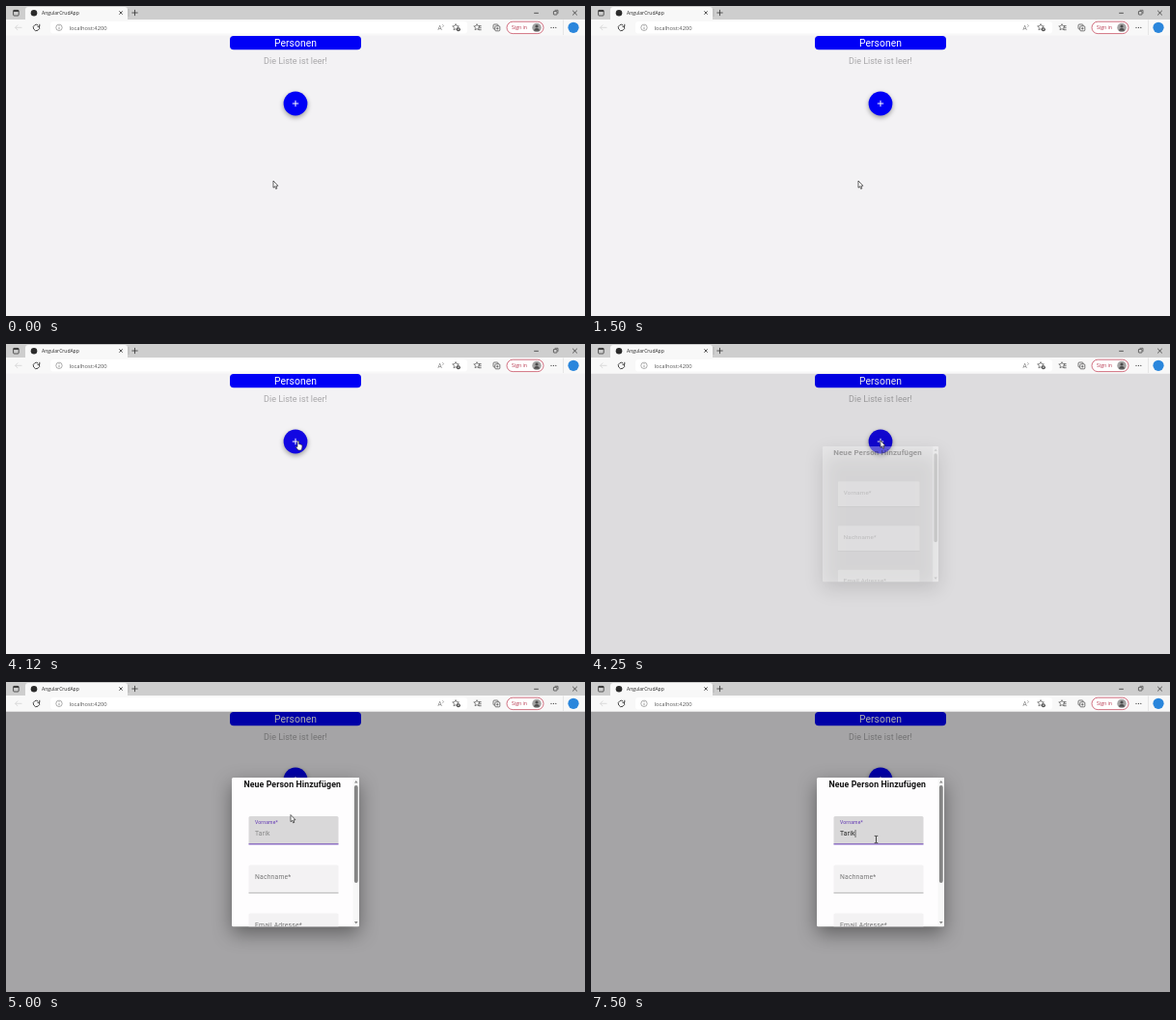
An HTML page with a canvas for the animation above (8000 ms loop, 600 px wide and 321 px high).

```html
<!DOCTYPE html>
<html lang="de">
<head>
<meta charset="utf-8">
<title>Personen</title>
<style>
html, body { margin: 0; width: 100%; height: 100%; overflow: hidden; background: #f3f2f4; }
canvas { display: block; width: 600px; height: 321px; }
</style>
</head>
<body>
<canvas id="stage"></canvas>
<script>
const W = 600, H = 321, LOOP = 8000, STEP = 125;
const canvas = document.getElementById('stage');
const ctx = canvas.getContext('2d');
const dpr = window.devicePixelRatio || 1;
canvas.width = W * dpr;
canvas.height = H * dpr;

const UI = '"Open Sans", "Noto Sans", sans-serif';
const APP = 'Roboto, Arial, sans-serif';
const NAME = 'Tarik';
const KEY_TIMES = [6000, 6500, 6750, 7250, 7500];
const PURPLE = '#6338b4';

// pointer path: time, x, y
const PATH = [
  [1875, 277, 181], [2500, 285, 151], [2625, 285, 151], [3500, 300, 100],
  [4750, 300, 100], [5000, 295, 137.5], [5250, 295.5, 163]
];

const clamp = v => Math.min(1, Math.max(0, v));
const lerp = (a, b, p) => a + (b - a) * p;
const span = (t, a, b) => clamp((t - a) / (b - a));
const smooth = p => p * p * (3 - 2 * p);

function rect(x, y, w, h, fill) {
  ctx.fillStyle = fill;
  ctx.fillRect(x, y, w, h);
}

function box(x, y, w, h, r, fill, stroke, lw = 0.8) {
  ctx.beginPath();
  ctx.roundRect(x, y, w, h, r);
  paint(fill, stroke, lw);
}

function disc(x, y, r, fill, stroke, lw = 0.8) {
  ctx.beginPath();
  ctx.arc(x, y, r, 0, Math.PI * 2);
  paint(fill, stroke, lw);
}

function paint(fill, stroke, lw) {
  if (fill) { ctx.fillStyle = fill; ctx.fill(); }
  if (stroke) { ctx.strokeStyle = stroke; ctx.lineWidth = lw; ctx.stroke(); }
}

function line(pts, color, lw = 0.8) {
  ctx.beginPath();
  for (let i = 0; i < pts.length; i += 2) ctx.lineTo(pts[i], pts[i + 1]);
  paint(null, color, lw);
}

function poly(pts, fill, stroke, lw) {
  ctx.beginPath();
  for (let i = 0; i < pts.length; i += 2) ctx.lineTo(pts[i], pts[i + 1]);
  ctx.closePath();
  paint(fill, stroke, lw);
}

function text(str, x, y, size, color, { font = APP, weight = 400, align = 'left', gap = 0 } = {}) {
  ctx.font = `${weight} ${size}px ${font}`;
  ctx.letterSpacing = gap * size + 'px';
  ctx.textAlign = align;
  ctx.fillStyle = color;
  ctx.fillText(str, x, y);
}

function shadow(color, blur, dy) {
  ctx.shadowColor = color;
  ctx.shadowBlur = blur * dpr;
  ctx.shadowOffsetY = dy * dpr;
}

function star(x, y, r, color) {
  const pts = [];
  for (let i = 0; i < 10; i++) {
    const a = -Math.PI / 2 + i * Math.PI / 5, d = i % 2 ? r * 0.48 : r;
    pts.push(x + d * Math.cos(a), y + d * Math.sin(a));
  }
  poly(pts, null, color, 0.7);
}

function drawTabs() {
  const dark = '#333';
  rect(0, 0, W, 14, '#cecece');
  box(20, 1, 106, 14, [3, 3, 0, 0], '#f8f8f8');
  box(7.6, 4.4, 5.6, 5.6, 1, null, dark);
  rect(7.6, 4.2, 5.6, 1.7, dark);
  disc(29, 7.2, 3.3, '#2b2b2b');
  text('AngularCrudApp', 37, 9, 5, '#222', { font: UI });
  line([117.3, 5.3, 120.7, 8.7], dark);
  line([120.7, 5.3, 117.3, 8.7], dark);
  line([127, 3, 127, 11], '#a8a8a8', 0.6);
  line([130.4, 7, 136.6, 7], dark);
  line([133.5, 3.9, 133.5, 10.1], dark);
  line([547.2, 7.3, 551.8, 7.3], dark);
  box(567.4, 5.4, 3.6, 3.6, 0.6, null, dark, 0.7);
  line([568.7, 4.3, 572, 4.3, 572, 7.8], dark, 0.6);
  line([587.2, 4.8, 591.8, 9.4], dark);
  line([591.8, 4.8, 587.2, 9.4], dark);
}

function drawToolbar() {
  const ink = '#555';
  rect(0, 14, W, 16.5, '#f8f8f8');
  line([16.5, 22.3, 9.5, 22.3], '#d4d4d4');
  line([12.3, 19.5, 9.5, 22.3, 12.3, 25.1], '#d4d4d4');
  ctx.beginPath();
  ctx.arc(31.5, 22.4, 3.2, -0.5, Math.PI * 1.65);
  paint(null, '#333', 0.9);
  line([34.8, 18.8, 34.8, 21.2, 32.3, 21.2], '#333', 0.9);

  box(46, 16, 432, 12.5, 3, '#fff');
  disc(55, 22.3, 3.2, null, '#777', 0.6);
  line([55, 21.8, 55, 24.2], '#777', 0.7);
  line([55, 20.3, 55, 21], '#777', 0.7);
  text('localhost:4200', 65.5, 24.6, 5.8, '#555', { font: UI });

  text('A', 447.4, 25, 6.6, '#777', { font: UI });
  line([452.4, 19.2, 453.4, 20.5, 452.4, 21.8], '#777', 0.6);
  star(466, 22, 3.5, ink);
  disc(468.8, 24.2, 2, '#444');
  line([467.7, 24.2, 469.9, 24.2], '#fff', 0.5);
  line([468.8, 23.1, 468.8, 25.3], '#fff', 0.5);

  star(488, 22, 3.4, ink);
  for (let i = 0; i < 3; i++) line([490, 20.7 + i * 2, 492.6, 20.7 + i * 2], '#444', 0.7);
  box(505, 19, 5, 5, 1, null, ink);
  box(506.8, 20.8, 5, 5, 1, '#f8f8f8', ink);
  line([508, 23.3, 510.6, 23.3], ink, 0.7);
  line([509.3, 22, 509.3, 24.6], ink, 0.7);

  box(519, 16.2, 38, 12.4, 6.2, '#fff', '#c74e62');
  text('Sign in', 524, 24.4, 5.2, '#b52f48', { font: UI });
  disc(550, 22.4, 4.7, '#a3a3a3');
  disc(550, 21, 1.6, '#4c4c4c');
  ctx.beginPath();
  ctx.arc(550, 25.8, 2.8, Math.PI, 0);
  paint('#4c4c4c');
  for (let i = 0; i < 3; i++) disc(565 + i * 2.4, 22.4, 0.6, '#444');
  line([577.5, 14.5, 577.5, 30], '#dedede', 0.7);
  disc(588, 22.3, 5.6, '#2a86dc');
}

function drawPage(t) {
  rect(0, 30.5, W, H - 30.5, '#f3f2f4');
  box(232, 31, 136, 14.3, 4, '#0000f6');
  text('Personen', 300, 41.8, 10.4, '#fff', { align: 'center' });
  text('Die Liste ist leer!', 300, 60, 9, '#a9a8aa', { align: 'center' });
  const hover = t >= 3375 && t < 4375;
  ctx.save();
  shadow('rgba(0,0,0,.38)', 5, 2);
  disc(300, 101, 12.4, hover ? '#1207e2' : '#0000f6');
  ctx.restore();
  line([296.8, 101, 303.2, 101], '#fff', 1);
  line([300, 97.8, 300, 104.2], '#fff', 1);
}

function field(y, label, focus, floatP) {
  const ink = '#777';
  box(251.5, y, 93, 29, [1.5, 1.5, 0, 0], focus ? '#d9d8d9' : '#f3f2f3');
  rect(251.5, y + 28.4, 93, focus ? 1 : 0.6, focus ? PURPLE : '#8c8c8c');
  text(label, 258, lerp(y + 14.8, y + 8.4, floatP), lerp(6.76, 5.07, floatP),
    focus ? PURPLE : ink, { gap: 0.031 });
}

function drawInput(t) {
  const typed = NAME.slice(0, KEY_TIMES.filter(k => t >= k).length);
  text(typed || NAME, 258, 159.4, 6.76, typed ? '#222' : '#858585', { gap: 0.031 });
  const blink = Math.floor((t - 5500) / 500) % 2 === 0;
  if (t >= 5500 && (blink || KEY_TIMES.includes(t) || t >= 7500)) {
    const x = 258 + (typed ? ctx.measureText(typed).width : 0);
    rect(x, 153, 0.6, 8, '#222');
  }
}

function drawDialog(t) {
  if (t < 4250) return;
  const shade = t < 4375 ? 0.09 : t < 4500 ? 0.285 : 0.32;
  const alpha = t < 4375 ? 0.32 : t < 4500 ? 0.86 : 1;
  const scale = t < 4375 ? 0.91 : 1;
  rect(0, 30.5, W, H - 30.5, `rgba(0,0,0,${shade})`);

  ctx.save();
  ctx.translate(300, 176.2);
  ctx.scale(scale, scale);
  ctx.translate(-300, -176.2);
  ctx.globalAlpha = alpha;
  ctx.save();
  shadow('rgba(0,0,0,.42)', 20, 7);
  box(234, 99, 132, 154.3, 1.5, '#fefdfe');
  ctx.restore();

  ctx.beginPath();
  ctx.rect(234, 99, 132, 154.3);
  ctx.clip();
  text('Neue Person Hinzufügen', 296.7, 109.4, 8.75, '#111',
    { weight: 700, align: 'center', gap: 0.0125 });
  const focus = t >= 4500;
  field(139, 'Vorname*', focus, smooth(span(t, 4375, 4625)));
  field(189.5, 'Nachname*', false, 0);
  field(239.5, 'Email Adresse*', false, 0);
  if (t >= 4625) drawInput(t);

  rect(359.5, 99, 6.5, 154.3, '#f7f7f7');
  box(360.9, 107, 3.8, 101, 1.9, '#858585');
  poly([361, 104.4, 362.8, 102, 364.6, 104.4], '#858585');
  poly([361, 248, 362.8, 250.4, 364.6, 248], '#858585');
  ctx.restore();
}

function pointerAt(t) {
  let a = PATH[0];
  for (const b of PATH) {
    if (t <= b[0]) {
      const p = b === a ? 0 : smooth(span(t, a[0], b[0]));
      return [lerp(a[1], b[1], p), lerp(a[2], b[2], p)];
    }
    a = b;
  }
  return [a[1], a[2]];
}

function drawPointer(t) {
  const [x, y] = pointerAt(t);
  ctx.save();
  ctx.translate(x, y);
  if (t >= 5125) {
    line([-1.8, -3.6, -0.4, -3.6, 0, -3, 0.4, -3.6, 1.8, -3.6], '#222', 0.7);
    line([0, -3.2, 0, 3.2], '#222', 0.8);
    line([-1.8, 3.6, -0.4, 3.6, 0, 3, 0.4, 3.6, 1.8, 3.6], '#222', 0.7);
  } else if (t >= 3375 && t < 4250) {
    poly([2, 0.6, 3, 0.4, 3.6, 1.2, 3.6, 3.6, 6, 4.2, 7, 5, 6.8, 7.4, 6, 10, 2.8, 10,
      0.4, 6.8, 0.6, 6, 2, 6.6], '#fff', '#222', 0.6);
  } else {
    poly([0, 0, 0, 7.2, 1.6, 5.8, 2.7, 8.4, 3.8, 7.9, 2.8, 5.4, 4.9, 5.2], '#fff', '#222', 0.7);
  }
  ctx.restore();
}

function render(t) {
  ctx.setTransform(dpr, 0, 0, dpr, 0, 0);
  drawPage(t);
  drawDialog(t);
  drawTabs();
  drawToolbar();
  drawPointer(t);
}

const start = performance.now();
function tick() {
  const t = (performance.now() - start) % LOOP;
  render(Math.floor((t + 5) / STEP) * STEP % LOOP);
  requestAnimationFrame(tick);
}
tick();
</script>
</body>
</html>
```
